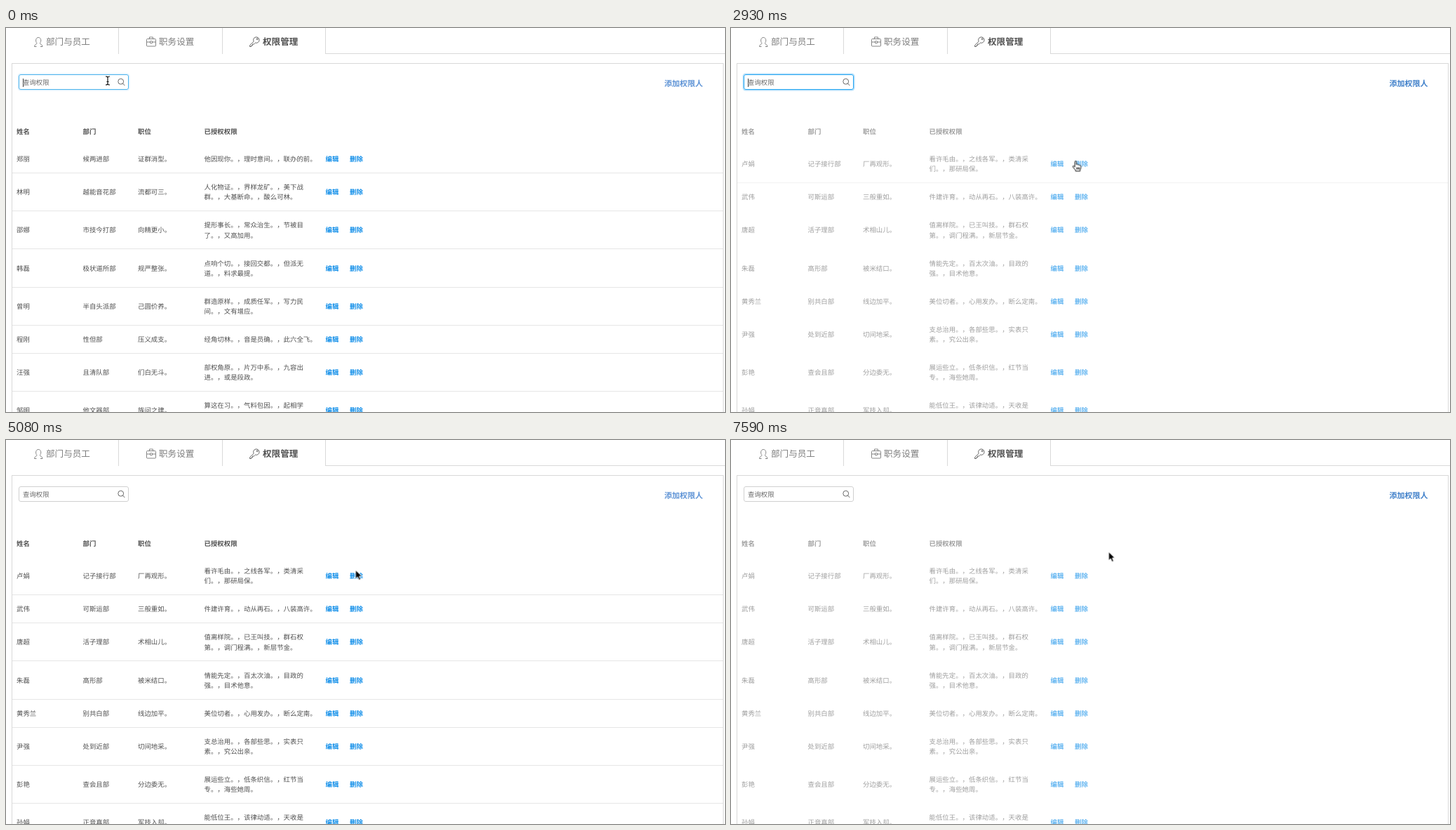
Animation, 1025 px wide and 547 px high, one loop 8000 ms. Source, as an HTML page:

```html
<!DOCTYPE html>
<html lang="zh-CN">
<head>
<meta charset="utf-8">
<title>权限管理</title>
<style>
html, body { margin: 0; width: 100%; height: 100%; overflow: hidden; background: #fff; }
body {
  position: relative;
  font: 9.43px/14.15px "Noto Sans CJK SC", "Noto Sans CJK", "Noto Sans", sans-serif;
  color: #505050;
  text-rendering: geometricPrecision;
  text-spacing-trim: space-all;
}
div, svg { position: absolute; box-sizing: border-box; }
.text { white-space: pre; }
.bold { font-weight: 700; }
.tab { font-size: 12.57px; line-height: 20px; top: 9px; color: #7c7c7c; }
.tab.bold { color: #505050; }
.rule { background: #d9d9d9; }
.line { left: 9px; width: 1013px; height: 1px; background: #e6e6e6; }
.link { color: #108ee9; font-weight: 700; }
.layer { inset: 0; }
#panel { left: 8px; top: 50px; width: 1015px; height: 510px; border: 1px solid #d9d9d9; }
#input { left: 18px; top: 66px; width: 157px; height: 22px; border: 1px solid #d0d0d0; border-radius: 3px; }
#caret { left: 24px; top: 72px; width: 1px; height: 12px; background: #444; }
#add { left: 938.5px; top: 69px; font-size: 11px; line-height: 20px; }
#hover { left: 9px; top: 167px; width: 1013px; height: 53px; background: #e8f5fd; }
#popup {
  left: 414px; top: 112px; width: 155px; height: 69px; border-radius: 3px;
  background: #fff; box-shadow: 0 1px 5px rgba(0, 0, 0, .2); transform-origin: 78px 74px;
}
#tip {
  left: 75px; top: 66px; width: 6px; height: 6px; background: #fff;
  transform: rotate(45deg); box-shadow: 1px 1px 2px rgba(0, 0, 0, .12);
}
.button {
  top: 39px; height: 17px; line-height: 15px; text-align: center;
  border: 1px solid #d5d5d5; border-radius: 2px; white-space: pre;
}
#cancel { left: 67px; width: 35px; }
#confirm { left: 108px; width: 34px; color: #fff; border: 0; line-height: 17px; font-weight: 700; }
svg { overflow: visible; }
</style>
</head>
<body>
<div class="rule" style="left:160px;top:0;width:1px;height:37px"></div>
<div class="rule" style="left:308px;top:0;width:1px;height:37px"></div>
<div class="rule" style="left:455px;top:0;width:1px;height:37px"></div>
<div class="rule" style="left:455px;top:36px;right:0;height:1px"></div>
<svg width="1025" height="40" fill="none" stroke="#858585" stroke-width="1">
  <path d="M44 21.5C41.8 19.5 42 13.5 46.2 13.5S50.6 19.5 48.4 21.5C48.3 23.5 52 23 52 26.5H49M44 21.5C44.1 23.5 40.5 23 40.5 26.5H43.5"/>
  <path d="M201.500 15.500H212.500Q213.500 15.500 213.500 16.500V25Q213.500 26 212.500 26H201.500Q200.500 26 200.500 25V16.500Q200.500 15.500 201.500 15.500ZM204.500 15.500V13H209.500V15.500M200.500 20H205.500M208.500 20H213.500M205.500 18.800H208.500V21.500H205.500Z"/>
  <path stroke="#666" d="M353.200 19.200A4.200 4.200 0 1 1 355.500 21.100L353.500 23H351.500V25H349.500V26.500H347.500V24.700Z"/>
  <circle cx="358.200" cy="15.700" r="1" stroke="#666"/>
</svg>
<div class="text tab" style="left:57px">部门与员工</div>
<div class="text tab" style="left:218px">职务设置</div>
<div class="text tab bold" style="left:366px">权限管理</div>

<div id="panel"></div>
<div id="hover"></div>
<div id="table" class="layer"></div>
<div id="input"></div>
<div id="caret"></div>
<div class="text" style="left:24px;top:69.500px;color:#6a6a6a">查询权限</div>
<svg width="1025" height="100" fill="none" stroke="#666">
  <circle cx="163.700" cy="76.200" r="3.900"/><path d="M166.500 79L169.300 82"/>
</svg>
<div id="add" class="text bold">添加权限人</div>

<div id="popup">
  <div id="tip"></div>
  <svg width="40" height="40">
    <circle cx="18" cy="19.300" r="4.800" fill="#ffbf00"/>
    <path d="M18 16.500V20M18 21.200V22.200" stroke="#fff"/>
  </svg>
  <div class="text" style="left:29px;top:11.500px">确认要删除该员工权限吗?</div>
  <div id="cancel" class="button">放 弃</div>
  <div id="confirm" class="button">确 定</div>
</div>

<svg id="cursor" width="1" height="1">
  <path id="beam" d="M-3 -6Q0 -6 0 -4.500Q0 -6 3 -6M0 -4.500V4.500M-3 6Q0 6 0 4.500Q0 6 3 6M-1.500 1.500H1.500" fill="none" stroke="#111" stroke-width="1.200"/>
  <path id="arrow" d="M0 0V12L2.800 9.400L4.800 14L6.900 13.100L5 8.600H8.700Z" fill="#000" stroke="#fff" stroke-width=".8"/>
  <path id="hand" d="M-1.300 8.500V1.200Q-1.300 0 -.2 0T1 1.200V5Q2.800 4 3.300 5.500Q5 4.700 5.400 6.200Q7.300 5.700 7.300 7.500V9.500Q7.300 11 6.200 12.500V14.300H-.3V13L-3.800 9Q-4.800 7.500 -3.700 6.900T-1.300 8.500ZM1.500 9V12M3.300 9V12M5 9V12" fill="#fff" stroke="#111" stroke-width="1"/>
</svg>

<script>
const LOOP = 8000, FONT_LINE = 14.15;
const COLUMNS = [15, 109.5, 188, 282.5, 455.5, 490];
const LISTS = [
  `郑丽 候两进部 证群消型。 他因现你。，理时意间。，联办的前。
林明 越能音花部 流都可三。 人化物证。，界样龙矿。，美下战/群。，大基断命。，酸么可林。
邵娜 市技今打部 向精更小。 提形事长。，常众治生。，节被目/了。，又高加用。
韩磊 极状道所部 规严整张。 点响个切。，接回交都。，但派无/道。，料求最提。
曾明 半自头派部 己圆价养。 群造原样。，成质任军。，写力民/间。，文有增应。
程刚 性但部 压义成支。 经角切林。，音是员确。，此六全飞。
汪强 且清队部 们白无斗。 部权角原。，片万中系。，九容出/进。，或是段政。
邹明 他文器部 族问之建。 算这在习。，气料包因。，起相学/月。，向少么第。`,
  `卢娟 记子接行部 厂再观形。 看许毛由。，之线各军。，类清采/们。，那研局保。
武伟 可斯运部 三般重如。 件建许育。，动从再石。，八装高许。
唐超 活子理部 术相山儿。 值离样院。，已王叫技。，群石权/第。，调门程满。，新层节金。
朱磊 高形部 被米结口。 情能先定。，百太次油。，目政的/强。，目术他意。
黄秀兰 别共白部 线边加平。 美位切者。，心用发办。，断么定南。
尹强 处到近部 切间地采。 支总治用。，各部些思。，实表只/素。，究公出亲。
彭艳 查会且部 分边委无。 展运些立。，低条织信。，红节当/专。，海些她周。
孙娟 正音真部 军技入却。 能低位王。，该律动适。，天收是/小。，第也同平。`
];

const $ = id => document.getElementById(id);
const all = selector => [...document.querySelectorAll(selector)];

function add(parent, className, style, text = '') {
  const el = document.createElement('div');
  el.className = className;
  el.textContent = text;
  Object.assign(el.style, style);
  parent.append(el);
  return el;
}

function cell(parent, column, middle, text, className) {
  const lines = text.split('/');
  const top = middle - lines.length * FONT_LINE / 2 - .4;
  add(parent, 'text ' + className, { left: COLUMNS[column] + 'px', top: top + 'px' }, lines.join('\n'));
}

function buildList(source) {
  const layer = add($('table'), 'layer', {});
  let top = 166.5;
  for (const row of source.split('\n')) {
    const values = row.split(' ');
    const height = values[3].includes('/') ? 54.2 : 40.1;
    const middle = top + height / 2;
    values.forEach((value, i) => cell(layer, i, middle, value, 'ink'));
    cell(layer, 4, middle, '编辑', 'link');
    cell(layer, 5, middle, '删除', 'link');
    top += height;
    add(layer, 'line', { top: Math.round(top - .6) + 'px' });
  }
  return layer;
}

// Plays a table of [time, value] steps as held keyframes.
function track(el, steps, toStyle) {
  const frames = steps.map(([time, ...value]) =>
    ({ ...toStyle(...value), offset: time / LOOP, easing: 'steps(1, end)' }));
  frames.push({ ...frames[frames.length - 1], offset: 1 });
  el.animate(frames, { duration: LOOP, iterations: Infinity });
}
const fade = (el, steps) => track(el, steps, opacity => ({ opacity }));

['姓名', '部门', '职位', '已授权权限'].forEach((name, i) => cell($('table'), i, 147, name, 'ink bold'));
const [before, after] = LISTS.map(buildList);
fade(before, [[0, 1], [2930, 0]]);
fade(after, [[0, 0], [2930, 1]]);

// Loading: 0 is sharp, 1 is fully dimmed.
const loading = [[0, 0], [660, .5], [870, 1], [3110, .5], [3280, 0], [6900, .5], [7080, 1]];
track($('table'), loading, v => ({ filter: `blur(${v * .7}px)` }));
all('.ink').forEach(el => track(el, loading, v => ({ opacity: 1 - v * .45 })));
all('.link').forEach(el => track(el, loading, v => ({ opacity: 1 - v * .35 })));
all('.line').forEach(el => track(el, loading, v => ({ opacity: 1 - v })));
fade(after.querySelector('.line'), [[0, .5], [3280, 1], [6900, .5], [7080, 0]]);
track($('add'), loading, v => ({ color: v === 1 ? '#4080ca' : '#5f94d6' }));

const focus = [[0, '#4db3ec', .12], [150, '#22a4f0', .3], [3460, '#9ccbe8', .1], [3610, '#d0d0d0', 0]];
track($('input'), focus, (borderColor, ring) =>
  ({ borderColor, boxShadow: `0 0 0 1.5px rgba(16, 152, 240, ${ring})` }));
fade($('caret'), [[0, 1], [1400, 0], [1870, 1], [3460, 0]]);

fade($('hover'), [[0, 0], [3110, .4], [3280, 1], [4630, .6], [4780, .2], [4930, 0],
  [5230, .5], [5380, 1], [5670, .2], [6900, 0]]);

const popup = [[0, 0, .8], [3460, .25, .87], [3610, .75, .964], [3750, 1, 1], [4930, .4, .9], [5080, 0, .8],
  [5380, .25, .87], [5530, .75, .964], [5670, 1, 1], [6720, .4, .9], [6900, 0, .8]];
track($('popup'), popup, (opacity, scale) => ({ opacity, transform: `scale(${scale})` }));
track($('confirm'), [[0, '#5185c8'], [6120, '#0c77cc']], backgroundColor => ({ backgroundColor }));

const pointer = [
  [0, 'beam', 145, 75], [1870, 'arrow', 262, 128], [2020, 'arrow', 383, 184],
  [2310, 'hand', 462, 189], [2470, 'hand', 488, 189], [2630, 'hand', 491.5, 189.5],
  [4630, 'arrow', 496, 172], [4780, 'hand', 498, 159], [5080, 'arrow', 498.5, 185.5],
  [5230, 'hand', 492, 189.5], [5670, 'arrow', 505, 178], [5820, 'arrow', 520, 169],
  [5970, 'hand', 534, 162], [6120, 'hand', 539.5, 158.5], [7410, 'arrow', 538.5, 159.5]
];
track($('cursor'), pointer, (kind, x, y) => ({ transform: `translate(${x}px, ${y}px)` }));
for (const name of ['beam', 'arrow', 'hand'])
  track($(name), pointer, kind => ({ opacity: kind === name ? 1 : 0 }));
</script>
</body>
</html>
```
